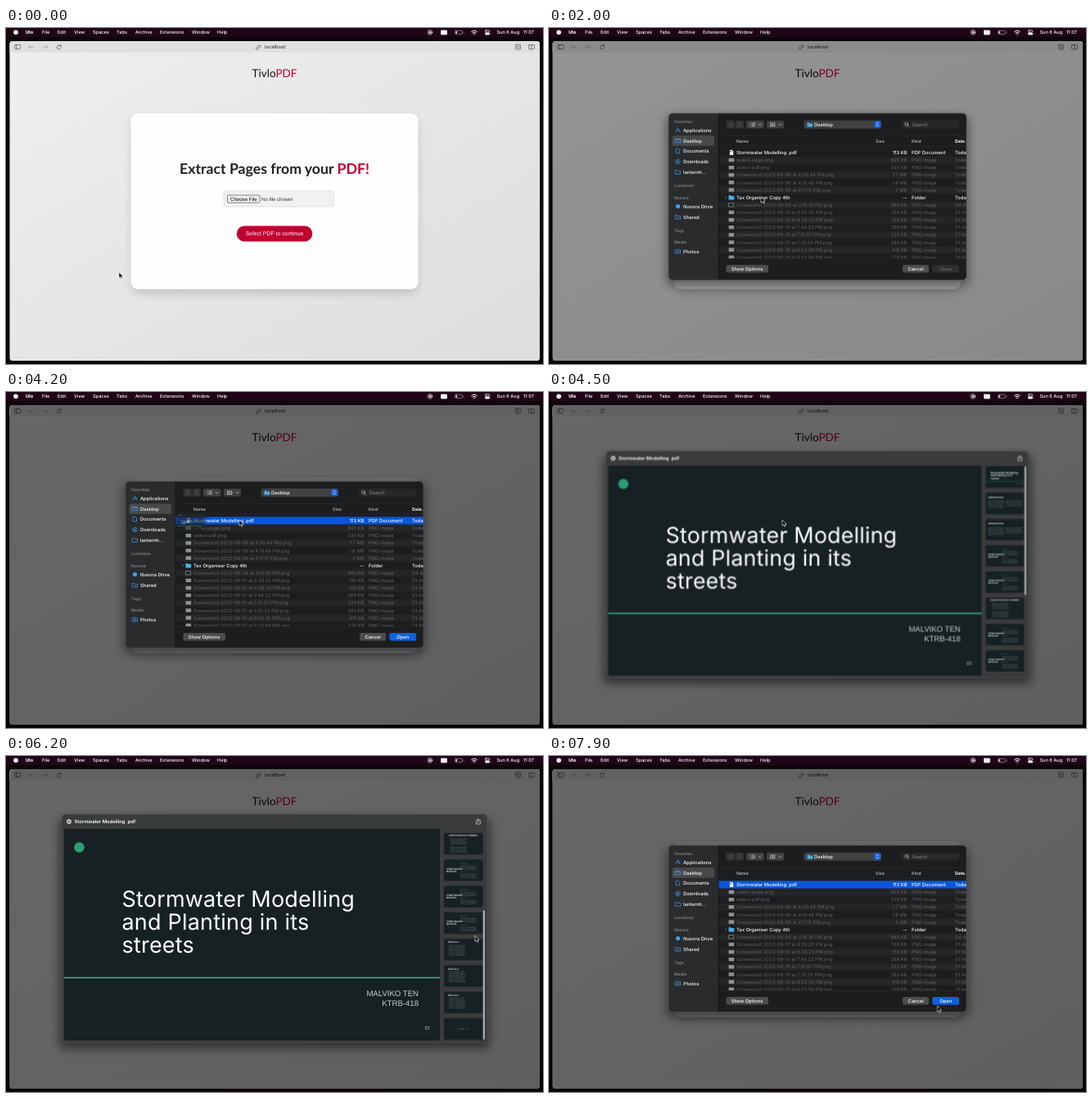
An HTML page for the animation above (8 s loop, 656x410 px).

```html
<!DOCTYPE html>
<html lang="en">
<head>
<meta charset="utf-8">
<title>Page extractor demo</title>
<style>
html, body { margin: 0; width: 100%; height: 100%; overflow: hidden; background: #0b0608; }
svg { display: block; width: 100vw; height: 100vh; }
text { font-family: Inter, "Open Sans", sans-serif; font-size: 5.8px; text-rendering: geometricPrecision; white-space: pre; }
.ui { fill: #fff; font-weight: 500; }
.menu text { font-size: 5.6px; }
.arial { font-family: "Liberation Sans", Arial, sans-serif; }
.lato { font-family: Lato, "Open Sans", sans-serif; }
.mid { text-anchor: middle; }
.end { text-anchor: end; }
.line { fill: none; stroke-width: .7; stroke-linecap: round; stroke-linejoin: round; }
.group { font-size: 5px; fill: #85868a; font-weight: 600; }
.dim text { fill: #626365; }
.dim .icon { opacity: .6; }
.red { fill: #c0002f; }

.anim, #cursor, #shade, #sheet, #look, #thumbs, #bar, .picked, #choose {
  animation: 8s infinite both;
  transform-box: view-box;
}
#cursor { animation-name: cursor; animation-timing-function: ease-in-out; }
#shade { animation-name: shade; animation-timing-function: linear; }
#sheet { animation-name: sheet; animation-timing-function: ease-out; }
#look { animation-name: look; animation-timing-function: ease-in-out; transform-origin: 328px 210px; }
#thumbs { animation-name: thumbs; animation-timing-function: ease-in-out; }
#bar { animation-name: bar; animation-timing-function: ease-in-out; }
.picked { animation-name: picked; animation-timing-function: step-end; }
#choose { animation-name: choose; animation-timing-function: step-end; }

@keyframes cursor {
  0% { transform: translate(138px, 298px); }
  11.25%, 22.5% { transform: translate(275px, 206px); }
  25%, 30% { transform: translate(259px, 206px); }
  37.5%, 40% { transform: translate(256px, 158px); }
  43.75%, 57.5% { transform: translate(285px, 156px); }
  61.25%, 63% { transform: translate(432px, 186px); }
  70%, 80.6% { transform: translate(573px, 219px); }
  87.5%, 88.75% { transform: translate(380px, 178px); }
  92.5%, 93.75% { transform: translate(485px, 266px); }
  98.75%, 100% { transform: translate(474.5px, 305px); }
}
@keyframes choose { 0% { fill: #efefef; } 12.5%, 100% { fill: #dadada; } }
@keyframes shade {
  0%, 23.1% { opacity: 0; }
  25% { opacity: .38; }
  30%, 100% { opacity: .57; }
}
@keyframes sheet {
  0%, 23.1% { opacity: 0; transform: translateY(-14px); }
  25% { opacity: 1; transform: translateY(-5px); }
  28.75%, 100% { opacity: 1; transform: none; }
}
@keyframes picked { 0% { opacity: 0; } 40%, 100% { opacity: 1; } }
@keyframes look {
  0%, 51.9% { opacity: 0; transform: translate(-106px, -53px) scale(.03); }
  53% { opacity: 1; }
  56.25% { transform: translate(-.3px, 0) scale(.9935); }
  57.5%, 80.6% { opacity: 1; transform: translate(0, 0) scale(1); }
  84.5% { opacity: 1; }
  86.25%, 100% { opacity: 0; transform: translate(-106px, -53px) scale(.03); }
}
@keyframes thumbs {
  0%, 72.5% { transform: translateY(0); }
  77.5%, 100% { transform: translateY(-157.3px); }
}
@keyframes bar {
  0%, 72.5% { transform: translateY(0); }
  77.5%, 100% { transform: translateY(98px); }
}
</style>
</head>
<body>
<svg viewBox="0 0 656 410" preserveAspectRatio="none">
  <defs>
    <linearGradient id="paper" x2="1" y2="1">
      <stop stop-color="#efefef"/><stop offset="1" stop-color="#dddddd"/>
    </linearGradient>
    <filter id="soft" x="-20%" y="-20%" width="140%" height="140%"><feGaussianBlur stdDeviation="6"/></filter>
    <clipPath id="sheetClip"><rect x="146" y="109" width="364" height="203.500" rx="5"/></clipPath>
    <clipPath id="listClip"><rect x="207" y="150" width="303" height="136"/></clipPath>
    <clipPath id="stripClip"><rect x="531" y="89" width="55" height="258"/></clipPath>
  </defs>

  <!-- menu bar -->
  <rect width="656" height="410" fill="#0b0608"/>
  <rect width="656" height="11" fill="#200516"/>
  <g class="menu" id="menu">
    <circle cx="12" cy="5.300" r="2.800" fill="#fff"/>
    <g class="line" stroke="#fff">
      <circle cx="518" cy="5.300" r="2.700"/>
      <circle cx="518" cy="5.300" r="1" fill="#fff"/>
      <rect x="531.500" y="3" width="7" height="5" rx=".6" fill="#fff"/>
      <rect x="548.500" y="3.200" width="9" height="4.400" rx="1.200" stroke="#a294a0"/>
      <path d="M559 4.800v1.300" stroke="#a294a0"/>
      <rect x="549.500" y="4.200" width="1.600" height="2.400" fill="#fff" stroke="none"/>
      <path d="M568.700 4.500q3.300-2.800 6.600 0M570 6q2-1.700 4 0M571.600 7.400h.8" stroke-width="1"/>
      <rect x="585.300" y="2.700" width="5.600" height="2.200" rx="1.100"/>
      <rect x="585.300" y="5.900" width="5.600" height="2.200" rx="1.100" fill="#fff"/>
    </g>
  </g>

  <!-- browser window -->
  <rect x="4.500" y="16" width="647.500" height="390" rx="3.500" fill="url(#paper)"/>
  <path d="M4.500 30V19.500a3.500 3.500 0 0 1 3.500-3.500H648.500a3.500 3.500 0 0 1 3.500 3.500V30z" fill="#e0e0e0"/>
  <g class="line" stroke="#555">
    <rect x="10.700" y="20.500" width="7" height="5.200" rx=".8"/><path d="M13 20.500v5.200"/>
    <path d="M33.500 23.300h-5.500m2.200-2.200-2.200 2.200 2.200 2.200M45 23.300h5.500m-2.200-2.200 2.200 2.200-2.200 2.200" stroke="#9b9b9b"/>
    <path d="M66.700 21.700a2.500 2.500 0 1 0 .6 2M67 20v1.900h-1.900"/>
    <path d="M307.300 24.500l2-2M307.700 22l1-1a1.500 1.500 0 0 1 2.100 2.100l-1 1M308.700 25l-1 1a1.500 1.500 0 0 1-2.100-2.100l1-1"/>
    <rect x="622.500" y="20.200" width="6" height="6" rx="1"/><path d="M624 22.200h3M624 24.200h3"/>
    <rect x="638.500" y="20.600" width="7" height="5.200" rx=".7"/><path d="M642 20.600v5.200"/>
  </g>
  <text x="316" y="25.400" fill="#333" font-weight="500">localhost</text>

  <text class="lato mid" x="328" y="60" style="font-size:13.500px" fill="#111">Tivlo<tspan class="red">PDF</tspan></text>
  <rect x="154" y="110" width="348" height="213" rx="9" opacity=".17" filter="url(#soft)"/>
  <rect x="152.500" y="104" width="351" height="214.800" rx="9" fill="#fdfdfd"/>
  <text class="lato mid" x="328" y="178" style="font-size:17.700px;font-weight:700" fill="#222">Extract Pages from your <tspan class="red">PDF!</tspan></text>
  <rect x="266" y="199" width="134.500" height="19" rx="3" fill="#f1f1f1" stroke="#dadada" stroke-width=".7"/>
  <rect id="choose" x="270.500" y="204" width="39.500" height="9.200" rx="1" stroke="#666" stroke-width=".8"/>
  <text class="arial mid" x="290.300" y="210.700" style="font-size:6.100px" fill="#000">Choose File</text>
  <text class="arial" x="312" y="210.700" style="font-size:6.100px" fill="#333">No file chosen</text>
  <rect x="281.800" y="241.500" width="92.500" height="19" rx="9.500" class="red"/>
  <text class="arial mid" x="328" y="253.400" style="font-size:6.900px" fill="#fff">Select PDF to continue</text>

  <rect id="shade" x="4.500" y="16" width="647.500" height="390" rx="3.500"/>

  <!-- file dialog -->
  <g id="sheet">
    <rect x="143" y="112" width="370" height="207" rx="7" opacity=".4" filter="url(#soft)"/>
    <g clip-path="url(#sheetClip)">
      <rect x="146" y="109" width="364" height="204" fill="#1c1d1f"/>
      <rect x="146" y="109" width="61" height="204" fill="#2a2b2d"/>
      <path d="M207.300 109v204" stroke="#0d0e0f" stroke-width=".6"/>
      <path d="M207.500 136.500H510M207.500 149H510M207.500 286.500H510" stroke="#2c2d2f" stroke-width=".6"/>
      <g id="side"></g>
      <g fill="#333436">
        <rect x="216.500" y="118" width="10.300" height="9.500" rx="2"/><rect x="227.600" y="118" width="10.300" height="9.500" rx="2"/>
        <g fill="#404143">
          <rect x="241" y="118" width="21.500" height="9.500" rx="2"/><rect x="266" y="118" width="21" height="9.500" rx="2"/>
          <rect x="311.500" y="117.700" width="94.500" height="10" rx="2"/>
        </g>
        <rect x="431" y="118" width="70" height="9.500" rx="2" fill="#27282a"/>
      </g>
      <g class="line" stroke="#77787a">
        <path d="M222.500 121l-1.600 1.700 1.600 1.700M232 121l1.600 1.700-1.600 1.700"/>
        <g stroke="#d5d5d6">
          <path d="M246 121h.1M246 122.800h.1M246 124.600h.1M247.800 121h3.700M247.800 122.800h3.700M247.800 124.600h3.700M256 122.200l1.600 1.500 1.600-1.500M281 122.200l1.500 1.500 1.500-1.500"/>
          <path d="M270.500 121h5.500M270.500 122.800h5.500M270.500 124.600h5.500" stroke-width="1.100" stroke-dasharray=".8 1.500"/>
          <circle cx="436.700" cy="122.300" r="1.900"/><path d="M438.200 123.900l1.500 1.500"/>
        </g>
      </g>
      <path d="M315.500 120.500h2.500l.8.900h3.200v4.100h-6.500z" fill="#45b1f0"/>
      <rect x="397.300" y="118.500" width="7.800" height="8.300" rx="1.800" fill="#1662e2"/>
      <path class="line" stroke="#fff" d="M399.800 121.800l1.400-1.500 1.400 1.500M399.800 123.500l1.400 1.500 1.400-1.500"/>
      <text class="ui" x="324" y="124.700">Desktop</text>
      <text x="443.500" y="124.700" fill="#88898b">Search</text>
      <g fill="#c4c5c7" style="font-weight:500">
        <text x="229" y="145" style="font-size:5.300px">Name</text><text x="399" y="145" style="font-size:5.300px">Size</text>
        <text x="443" y="145" style="font-size:5.300px">Kind</text><text x="496" y="145" style="font-size:5.300px;font-weight:700" fill="#fff">Date Added</text>
      </g>
      <g clip-path="url(#listClip)">
        <g id="stripes" fill="#fff" opacity=".035"></g>
        <rect class="picked" x="207.500" y="152.300" width="303" height="9.200" fill="#0a57dc"/>
        <g id="rows"></g>
      </g>
      <g class="ui">
        <rect x="216.500" y="294" width="51.500" height="9.500" rx="2" fill="#4b4c4e"/><text class="mid" x="242" y="300.800">Show Options</text>
        <rect x="432" y="294" width="32" height="9.500" rx="2" fill="#4b4c4e"/><text class="mid" x="448" y="300.800">Cancel</text>
        <rect x="468.500" y="294" width="32.500" height="9.500" rx="2" fill="#2d2e30"/><text class="mid" x="484.700" y="300.800" fill="#696a6c">Open</text>
        <g class="picked"><rect x="468.500" y="294" width="32.500" height="9.500" rx="2" fill="#0f60e6"/><text class="mid" x="484.700" y="300.800">Open</text></g>
      </g>
    </g>
    <rect x="146" y="109" width="364" height="203.500" rx="5" fill="none" stroke="#5a5b5d" stroke-width=".6"/>
  </g>

  <!-- preview panel -->
  <g id="look">
    <rect x="65" y="76" width="526" height="281" rx="7" opacity=".5" filter="url(#soft)"/>
    <rect x="68" y="71" width="520" height="278.500" rx="5" fill="#3a3b3c" stroke="#5b5c5d" stroke-width=".5"/>
    <circle cx="77" cy="80" r="2.900" fill="#c9c9c9"/>
    <path class="line" d="M75.900 78.900l2.200 2.200m0-2.200l-2.200 2.200" stroke="#3a3b3c"/>
    <text class="ui" x="83.500" y="82.200" style="font-weight:600">Stormwater Modelling .pdf</text>
    <path class="line" stroke="#d0d0d0" d="M575.800 79h-1.300v4h5v-4h-1.300M577 81v-4.300m-1.300 1.300 1.300-1.300 1.300 1.300"/>
    <rect x="71" y="89" width="459" height="258" rx="1.500" fill="#172124"/>
    <circle cx="89.500" cy="111.500" r="6.200" fill="#2a9d72"/>
    <g fill="#fff" id="cover" style="letter-spacing:.2px"></g>
    <path d="M71 270.500H530" stroke="#43b88f" stroke-width="1.300"/>
    <g class="end" fill="#c9cdd0">
      <text class="arial" x="504" y="293.300" style="font-size:9.600px">MALVIKO TEN</text>
      <text class="arial" x="504" y="304.700" style="font-size:9.600px">KTRB-418</text>
      <text x="517.500" y="334.300">01</text>
    </g>
    <g clip-path="url(#stripClip)"><g id="thumbs"></g></g>
    <rect id="bar" x="582.700" y="90" width="2.300" height="158" rx="1.100" fill="#a5a6a7"/>
  </g>

  <path id="cursor" d="M0 0V7.200L1.700 5.700 2.800 8.200 4 7.700 2.900 5.200H5.100Z" fill="#000" stroke="#fff" stroke-width=".6"/>
</svg>
<script>
const put = (id, html) => document.getElementById(id).insertAdjacentHTML('beforeend', html);
const text = (x, y, s, attrs = '') => `<text x="${x}" y="${y}" ${attrs}>${s}</text>`;
const size = (px, fill, more = '') => `style="font-size:${px}px;fill:${fill};${more}"`;

// menu titles
const titles = [[24, 'Ulo'], [44, 'File'], [63, 'Edit'], [83, 'View'], [106, 'Spaces'], [135, 'Tabs'], [158, 'Archive'],
  [188, 'Extensions'], [227, 'Window'], [258, 'Help'], [599.5, 'Sun 6 Aug'], [632, '11:07']];
put('menu', titles.map(([x, s], i) =>
  text(x, 7.3, s, `class="ui" ${i ? '' : 'font-weight="800" style="font-weight:800"'}`)).join(''));

// sidebar
const folder = 'M-3-2h2.200l.8.900h3v3.700h-6z';
const places = [
  [119, 'Favorites'],
  [129.5, 'Applications', 'M-2.800 2.300L0-2.700 2.800 2.300M-1.700.6h3.400'],
  [142.5, 'Desktop', 'M-3-2.200h6v4.400h-6zM-3-.9h6'],
  [155, 'Documents', 'M-2-2.800h2.600L2-1.300v4.100h-4z'],
  [168, 'Downloads', 'M-2.700 0a2.700 2.700 0 1 0 5.400 0a2.700 2.700 0 1 0-5.400 0M0-1.400v2.700m-1.100-1 1.100 1 1.100-1'],
  [180.5, 'lanternh...', folder],
  [197, 'Locations'],
  [212, 'Nuvora'],
  [222.5, 'Nuvora Drive', ''],
  [235.5, 'Shared', folder + 'M-1 .8h2'],
  [252, 'Tags'],
  [266.5, 'Media'],
  [277.5, 'Photos', 'M-3-1.600h1.500l.6-.9h1.800l.6.900h1.500v4h-6zM-1 .4a1 1 0 1 0 2 0a1 1 0 1 0-2 0']
];
put('side', '<rect x="150.500" y="136.200" width="51.500" height="12.500" rx="2.500" fill="#48494b"/>' +
  places.map(([y, name, icon]) => {
    if (icon === undefined) return text(153, y + 1.8, name, 'class="group"');
    const mark = icon
      ? `<path class="line" stroke="#3f9ff5" transform="translate(157.500 ${y})" d="${icon}"/>`
      : `<circle cx="157.500" cy="${y}" r="2.600" fill="#3f9ff5"/>`;
    return mark + text(164, y + 2.1, name, 'class="ui"');
  }).join(''));

// file list
const shot = (day, time) => `Screenshot 2023-08-${day} at ${time} PM.png`;
const files = [
  ['Stormwater Modelling .pdf', '113 KB', 'Today'],
  ['select-page.png', '605 KB', 'Today'],
  ['select-pdf.png', '533 KB', 'Today'],
  [shot('06', '4.20.44'), '1.7 MB', 'Today'],
  [shot('06', '4.19.48'), '1.6 MB', 'Today'],
  [shot('06', '4.17.15'), '2 MB', 'Today'],
  ['Tax Organiser Copy 4th', '--', 'Today'],
  [shot('04', '3.18.35'), '980 KB', '04-Aug'],
  ...[['8.30.25', 190], ['8.28.23', 159], ['7.44.22', 268], ['7.41.07', 223], ['7.25.55', 283], ['6.53.30', 415], ['6.53.04', 278]]
    .map(([time, kb]) => [shot('01', time), kb + ' KB', '01-Aug'])
];
files.forEach(([name, bytes, date], i) => {
  const y = 156.9 + i * 9.13, base = y + 2.1;
  const kind = i === 0 ? 'PDF Document' : i === 6 ? 'Folder' : 'PNG image';
  const icon = i === 0
    ? `<path d="M220.800 ${y - 3.2}h2.800l1.600 1.600v4.800h-4.400z" fill="#f2f2f2"/><path d="M221 ${y - 1.2}h2.500" stroke="#d33" stroke-width="1"/>`
    : i === 6
      ? `<path d="M219.500 ${y - 2.7}h2.500l.8.900h3.400v4.500h-6.700z" fill="#45b1f0"/><path class="line" d="M215.300 ${y - 1.5}l1.400 1.500-1.400 1.500" stroke="#8b8c8e"/>`
      : i === 7
        ? `<rect class="icon line" x="219.800" y="${y - 2.2}" width="6" height="4.400" stroke="#ddd"/>`
        : `<rect class="icon" x="219.500" y="${y - 2.2}" width="6.700" height="4.400" fill="#ddd"/>`;
  const live = i === 0 || i === 6;
  put('rows', `<g class="${live ? 'ui' : 'dim'}">${icon}${text(229, base, name)}${text(437.5, base, bytes, 'class="end"')}` +
    `${text(443, base, kind)}${text(496, base, date)}</g>`);
  if (i % 2) put('stripes', `<rect x="207.500" y="${y - 4.56}" width="303" height="9.130"/>`);
});

// preview cover and page strip
const cover = ['Stormwater Modelling', 'and Planting in its', 'streets'];
put('cover', cover.map((s, i) => text(141.5, 184.3 + i * 28, s, size(27, '#fff'))).join(''));

const notes = ['Rain falls on the paved road', 'and runs along the kerb line', 'to drains under the ground', 'where soil holds the water'];
const para = (x, y, n, px = 1.55) => Array.from({ length: n }, (_, i) =>
  text(x, y + i * 2, notes[(i * 3 + n) % 4], size(px, '#aeb6b8'))).join('');
const head = (x, y, s, attrs = '') => text(x, y, s, size(2.4, '#fff', 'font-weight:700') + attrs);
const layouts = {
  title: () => cover.map((s, i) => text(6, 9 + i * 3.3, s, size(3.2, '#fff', 'font-weight:600'))).join('') +
    '<path d="M0 18.500H47.500" stroke="#2d8567" stroke-width=".4"/>' + text(38, 22, 'MALVIKO TEN', size(1.3, '#aaa')),
  columns: () => head(3, 6.5, 'INTRODUCTION') + para(3, 11, 5) + para(25, 11, 4),
  split: () => head(3, 12, 'STREET RUNOFF') + head(3, 15, 'METHODS') +
    text(20, 5, 'Drain types', size(1.6, '#43b88f')) + para(20, 8, 3) +
    text(20, 15.5, 'Soil types', size(1.6, '#43b88f')) + para(20, 18.5, 3),
  center: () => head(23.7, 4, 'RUNOFF AND SOIL PLANNING', ' class="mid"') + para(8, 8, 4) + para(8, 17.5, 4),
  refs: () => head(5, 5, 'References') + para(6, 8.5, 7),
  last: () => text(23.7, 14, 'THANK YOU', size(2.4, '#2a9d72') + ' class="mid"')
};
const deck = 'title columns columns split split center split split split refs refs refs last'.split(' ');
put('thumbs', deck.map((kind, i) =>
  `<g transform="translate(535 ${90 + i * 32.25})"><rect width="47.500" height="26.300" rx="1.500" fill="#172124"/>${layouts[kind]()}</g>`).join(''));
</script>
</body>
</html>
```
